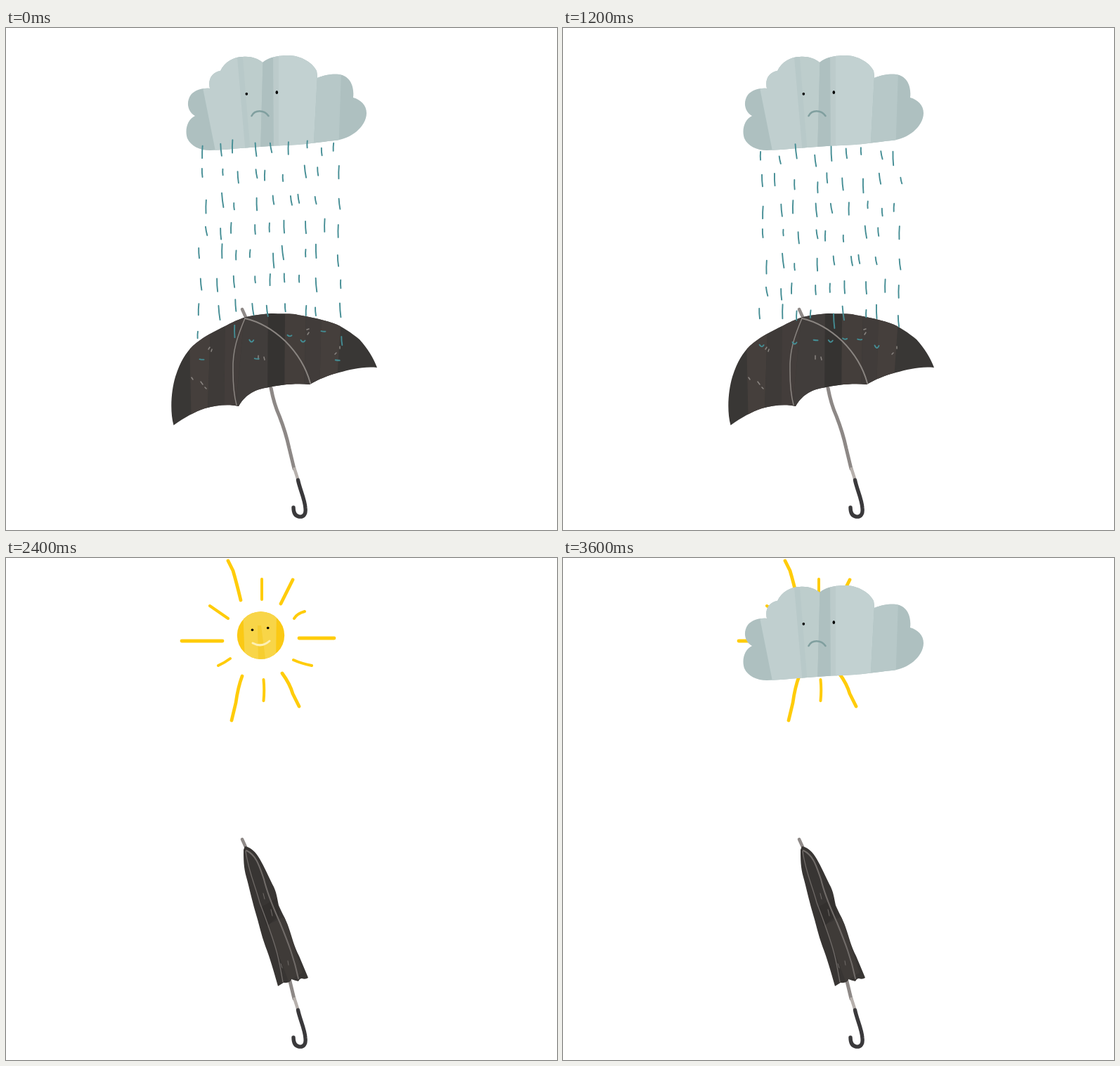
These frames come from a looping animation (784x714 px, 3900 ms). An HTML page:

```html
<!DOCTYPE html>
<html lang="en">
<head>
<meta charset="utf-8">
<title>Rain and sun</title>
<style>
html, body { margin: 0; width: 100%; height: 100%; overflow: hidden; background: #fff; }
svg { display: block; width: 784px; height: 714px; }
path { stroke-linecap: round; stroke-linejoin: round; }
.line { fill: none; }
.layer { animation: 3900ms step-end infinite; }

/* 13 steps of 300 ms: one step is 7.6923 % */
#rain0 { animation-name: rain0; }
#rain1 { animation-name: rain1; }
#rain2 { animation-name: rain2; }
#cloud { animation-name: cloud; }
#sun { animation-name: sun; }
#open { animation-name: open; }
#closed { animation-name: closed; }
.ray { vector-effect: non-scaling-stroke; transform-origin: 362.5px 110px; animation-name: pulse; }
#longRays { --pulse: .82; }
#shortRays { --pulse: 1.12; }

@keyframes rain0 { 0%, 23.0769% { opacity: 1; } 7.6923%, 30.7692%, 100% { opacity: 0; } }
@keyframes rain1 { 7.6923%, 30.7692% { opacity: 1; } 0%, 15.3846%, 38.4615%, 100% { opacity: 0; } }
@keyframes rain2 { 15.3846%, 38.4615% { opacity: 1; } 0%, 23.0769%, 46.1538%, 100% { opacity: 0; } }
@keyframes cloud {
  0% { opacity: 1; transform: none; }
  53.8461% { opacity: 1; transform: translateX(-185px); }
  61.5384% { opacity: 0; transform: none; }
  84.6153% { opacity: 1; transform: translateX(216px); }
  92.3076%, 100% { opacity: 1; transform: none; }
}
@keyframes sun { 0% { opacity: 0; } 53.8461%, 100% { opacity: 1; } }
@keyframes pulse {
  0%, 61.5384%, 76.9230%, 92.3076%, 100% { transform: none; }
  53.8461%, 69.2307%, 84.6153% { transform: scale(var(--pulse)); }
}
@keyframes open { 0% { opacity: 1; } 61.5384%, 100% { opacity: 0; } }
@keyframes closed { 0% { opacity: 0; } 61.5384%, 100% { opacity: 1; } }
</style>
</head>
<body>
<svg viewBox="0 0 784 714" xmlns="http://www.w3.org/2000/svg">
  <defs>
    <clipPath id="cloudClip"><path d="M290 174C276 174 263 168 258 157C254 145 258 130 269 125C258 119 256 105 263 95C269 88 280 85 290 86C287 73 293 63 305 61C311 48 324 41 337 41C348 40 358 43 365 49C375 41 389 39 402 39C420 39 437 50 442 61Q443 66 443 71C454 66 466 65 474 66C489 68 496 82 494 99C505 102 513 110 513 121C513 140 491 158 468 160C440 163 425 166 396 167C360 168 320 173 290 174Z"/></clipPath>
    <clipPath id="openClip"><path d="M238.500 565C233 545 235 516 241 496C248 474 256 462 266 452C280 440 290 435 302 429C318 421 328 415 342 411C355 408 366 407 378 406C390 407 400 406 411 407C424 410 446 413 466 420C478 424 492 434 503 443C515 456 523 470 528 483C508 481 490 486 474 490C458 494 444 500 432 507C411 505 388 508 374 511C351 514 339 524 331 538C318 535 300 536 283 541C268 546 254 554 238.500 565Z"/></clipPath>
    <clipPath id="sunClip"><circle cx="362.500" cy="110" r="33.700"/></clipPath>
    <clipPath id="closedClip"><path d="M340 410C348 411 356 419 361 428C368 440 373 452 379 464C385 474 386 485 388 494C393 506 399 515 402 525C407 539 410 553 417 566L430 597Q426 600 421 598Q418 598 416 602Q411 601 406 599Q405 605 395 604L387 609C381 588 376 570 369 552C363 536 360 520 355 504C349 483 346 468 342 454C338 440 338 428 338 415Z"/></clipPath>
  </defs>

  <g class="line">
    <path d="M336 400L341 411" stroke="#8f8a88" stroke-width="4.500"/>
    <path d="M377 512C380 528 384 541 389 552C396 570 400 584 403 598L410 627" stroke="#8d8886" stroke-width="5"/>
    <path d="M410.500 627L415 641" stroke="#b6b0ac" stroke-width="4.500"/>
    <path d="M415.500 643C418 656 425 669 426 683C427 692 423 696 417 695C411 694 409 689 409 682" stroke="#3a393b" stroke-width="5.400"/>
  </g>

  <g id="open" class="layer">
    <g clip-path="url(#openClip)">
      <path fill="#393735" d="M230 400h300v170h-300z"/>
      <path fill="#453f3c" d="M260 400h32l-6 170h-22z"/>
      <path fill="#3e3a38" d="M292 400h20l-2 170h-24z"/>
      <path fill="#433d3b" d="M312 400h28l-16 170h-14z"/>
      <path fill="#413d3b" d="M340 400h33l-1 170h-48z"/>
      <path fill="#353331" d="M373 400h24l-1 170h-24z"/>
      <path fill="#443e3b" d="M397 400h30l-4 170h-27z"/>
      <path fill="#413c3a" d="M427 400h22l-4 170h-22z"/>
      <path fill="#453f3c" d="M449 400h29l-12 170h-21z"/>
    </g>
    <g class="line" stroke="#8a8581">
      <path d="M340 413C330 437 322 458 323 487C323 510 325 525 328 536" stroke-width="1.500"/>
      <path d="M340 413C362 418 382 431 397 445C414 462 427 483 433 505" stroke-width="1.900"/>
      <path d="M288 457l2-3M292 460l1-3M264 497l2 3M277 503l3 4M283 511l2 2M359 466v5M367 468l1 4M428 429l3-1M429 436l2-3M475 453v3M468 464l2-2" stroke-width="1.500"/>
    </g>
  </g>

  <g id="closed" class="layer">
    <g clip-path="url(#closedClip)">
      <path fill="#383533" d="M330 400h110v220h-110z"/>
      <path fill="#3f3b38" d="M372 522l24-12 26 80-20 12z"/>
      <path fill="#33302e" d="M362 497l23-13 4 24-18 16z"/>
    </g>
    <g class="line" stroke="#716c69">
      <path d="M341 417C345 446 355 467 361 490C371 517 377 532 384 556C389 572 391 588 394 603" stroke-width="1.300"/>
      <path d="M342 416C357 423 361 440 367 457C373 482 383 503 390 519C401 546 410 569 416 598" stroke-width="2"/>
      <path d="M366 477l2 8M377 500l2 9M391 577l2 6M401 573l1 6" stroke-width="1"/>
    </g>
  </g>

  <g id="sun" class="layer">
    <g class="line" stroke="#ffcc0a">
      <path id="longRays" class="ray layer" stroke-width="4.800" d="M334 60Q328 35 323 18L316 4M391 65L408 31M417 114H467M393 164Q404 179 408 193L417 211M336 168Q330 184 327 206L321 231M308 118H250"/>
      <path id="shortRays" class="ray layer" stroke-width="4" d="M364 59V30M410 86Q414 79 425 76M409 145Q420 150 435 153M366.500 173Q368 188 366.500 203M319 143Q311 149 302 153M316 86L290 68"/>
    </g>
    <g clip-path="url(#sunClip)">
      <path fill="#fbc914" d="M325 70h75v80h-75z"/>
      <path fill="#f8d548" d="M337 70h48l-1 80h-44z"/>
      <path fill="#f6ce30" d="M358 96h5l7 54h-11z"/>
    </g>
    <circle cx="350.500" cy="102.300" r="1.800"/>
    <circle cx="372.700" cy="99.500" r="1.800"/>
    <path class="line" d="M351 121Q364 128 375 118" stroke="#fdf0b5" stroke-width="3"/>
  </g>

  <g id="cloud" class="layer">
    <g clip-path="url(#cloudClip)">
      <path fill="#aec0c0" d="M250 30h270v150h-270z"/>
      <path fill="#c0cfcf" d="M275 60l30-30h23l18 150h-47z"/>
      <path fill="#b8c9c9" d="M328 30h10l12 150h-9z"/>
      <path fill="#bdcdcc" d="M336 30h30l-4 150h-14z"/>
      <path fill="#aec0c0" d="M366 30h14l1 150h-19z"/>
      <path fill="#bccbcb" d="M380 30h10v150h-9z"/>
      <path fill="#c2d1d1" d="M388 30h57l-8 150h-49z"/>
      <path fill="#b7c8c8" d="M445 30h33l-5 150h-36z"/>
    </g>
    <ellipse cx="342.300" cy="93.800" rx="1.800" ry="2"/>
    <ellipse cx="385.300" cy="91.500" rx="1.800" ry="2.500"/>
    <path class="line" d="M349.500 125C354 116 367 116 373.500 125" stroke="#809f9f" stroke-width="2.600"/>
  </g>

  <g class="line" stroke="#448d94" stroke-width="1.900">
    <path id="rain0" class="layer"/>
    <path id="rain1" class="layer"/>
    <path id="rain2" class="layer"/>
  </g>
</svg>

<script>
const columns = 9, columnGap = 24, rowGap = 38;
const fall = 86, drift = 5;
const left = 279, top0 = 172, bottom = 520;

// Repeatable random number from 0 to 1
const noise = (a, b) => {
  const s = Math.sin(a * 127.1 + b * 311.7) * 43758.5453;
  return s - Math.floor(s);
};

const canopy = x => 406 + 0.0027 * (x - 395) ** 2;

const drop = (x, y, len, lean) =>
  `M${x - lean / 2} ${y - len / 2}q${lean / 2 - 0.6} ${len / 2} ${lean} ${len}`;
const splash = (x, y, depth) => `M${x - 3} ${y}q3 ${depth} 6 0.5`;

// One drifting field of drops; those that reach the canopy turn into splashes
function rain(step) {
  let d = '';
  const firstRow = -Math.floor(step * fall / rowGap);
  for (let row = firstRow; ; row++) {
    const rowY = top0 + row * rowGap + step * fall;
    if (rowY > bottom) return d;
    for (let col = 0; col < columns; col++) {
      const random = k => noise(row * columns + col + 60, k);
      const x = left + col * columnGap + step * drift + 14 * (random(1) - 0.5);
      const y = rowY + 14 * (random(2) - 0.5);
      const depth = y - canopy(x) - 25 * random(5);
      if (depth < 0) d += drop(x, y, 8 + 13 * random(3), 3 * random(4) - 0.6);
      else if (depth < rowGap && random(6) < 0.6) d += splash(x, y, 8 * random(3));
    }
  }
}

for (let step = 0; step < 3; step++) {
  document.getElementById('rain' + step).setAttribute('d', rain(step));
}
</script>
</body>
</html>
```
